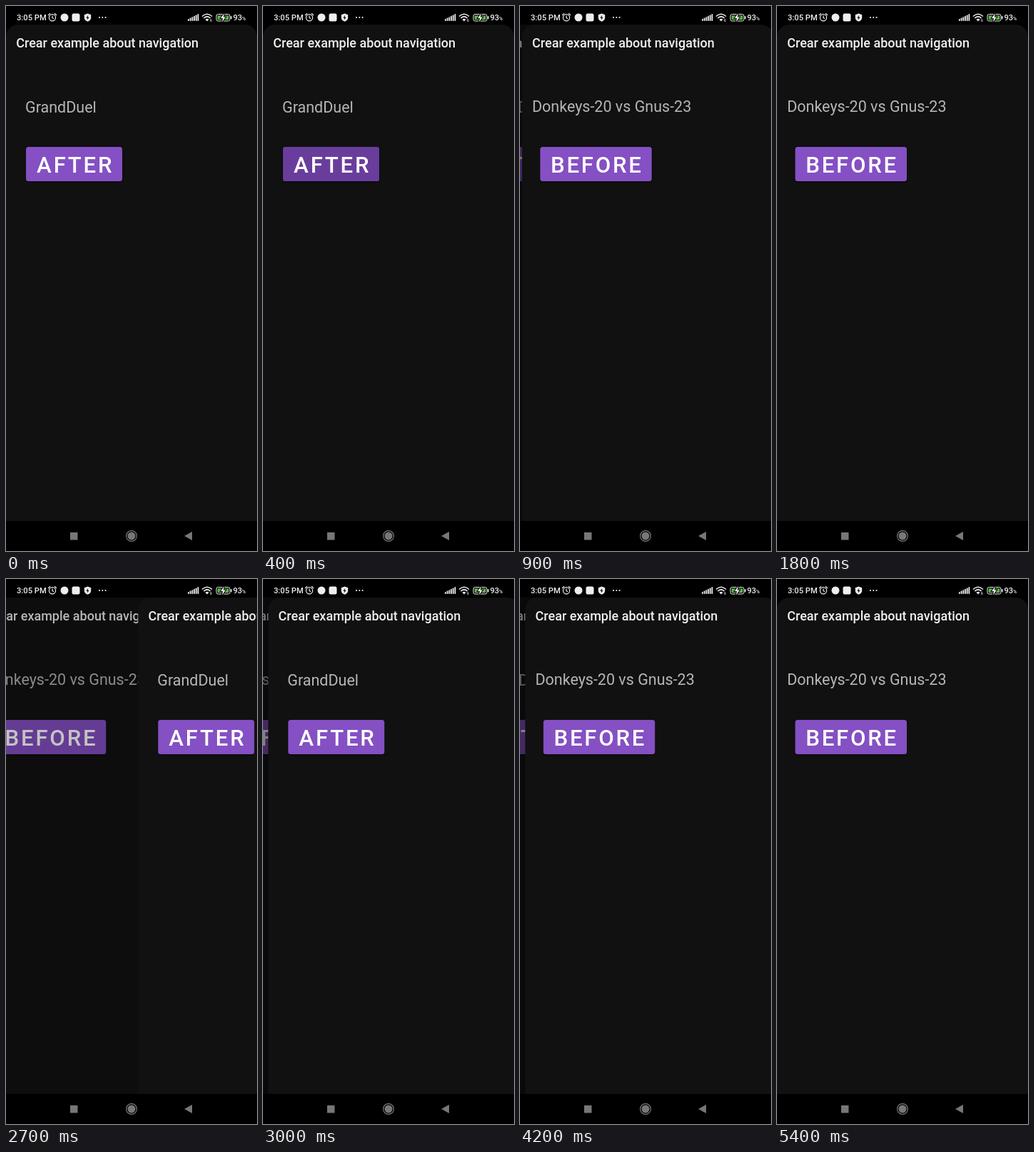
An HTML page that plays this animation: 352 by 762 pixels, repeating every 5500 ms.

```html
<!DOCTYPE html>
<html lang="es">
<head>
<meta charset="utf-8">
<title>Navigation example</title>
<style>
  html, body { margin: 0; width: 100%; height: 100%; overflow: hidden; background: #000; }
  svg { display: block; width: 352px; height: 762px; font-family: Roboto, sans-serif; }
  .title { font-size: 18px; font-weight: 500; fill: #f0f0f0; }
  .body { font-size: 21.5px; fill: #b6b6b6; }
  .label { font-size: 31.2px; font-weight: 500; letter-spacing: .0893em; fill: #fff; }
  .button { fill: #8450c3; filter: drop-shadow(0 1px 1px #0008); }
  .ripple { fill: #693d9c; }
  .status { font-size: 11.2px; font-weight: 500; fill: #eee; }
</style>
</head>
<body>
<svg viewBox="0 0 352 762">
  <rect width="352" height="762"/>
  <g id="pages"></g>

  <g class="status">
    <text x="15" y="20">3:05 PM</text>
    <g fill="none" stroke="#eee" stroke-width="1.2">
      <circle cx="65" cy="16.3" r="4.6"/>
      <path d="M65 13.5v3l2 1.3M59 13l3-2.7M71 13l-3-2.7"/>
    </g>
    <circle cx="82" cy="16" r="5.5"/>
    <rect x="92.5" y="10.5" width="11" height="11" rx="2.5"/>
    <path d="M114.5 10.5l4.7 1.7v4q0 3.5-4.7 5.5q-4.7-2-4.7-5.5v-4z"/>
    <path d="M115.3 12.7l-3 4h2l-.7 3 3-4h-2z" fill="#000"/>
    <g id="dots"></g>
    <g id="signal"></g>
    <path d="M275 14.5q7-6.5 14 0M277.3 17q4.7-4.2 9.4 0" fill="none" stroke="#eee" stroke-width="1.6"/>
    <path d="M279.5 18.8q2.5-2 5 0l-2.5 2.7z"/>
    <text x="286" y="21.5" font-size="5">6</text>
    <rect x="295" y="11.5" width="19" height="9.5" rx="2.5" fill="none" stroke="#eee"/>
    <rect x="296.7" y="13.2" width="15.6" height="6.1" rx="1" fill="#5cb84a"/>
    <rect x="315" y="14" width="1.5" height="4.5" rx=".7"/>
    <path d="M306 10l-5 7h3l-1 5.5 5-7h-3z" stroke="#000" stroke-width="2" paint-order="stroke"/>
    <text x="318.5" y="20">93</text>
    <text x="331" y="20" font-size="7">%</text>
  </g>

  <g fill="#777">
    <rect y="720" width="352" height="42" fill="#000"/>
    <rect x="90" y="736" width="10.5" height="10.5"/>
    <circle cx="176" cy="741" r="5.5"/>
    <circle cx="176" cy="741" r="7.4" fill="none" stroke="#777" stroke-width="1.2"/>
    <path d="M250 741l11-6v12z"/>
  </g>
</svg>
<script>
const WIDTH = 352, LOOP = 5500, STEP = 100, SPRING = 0.014;
const $ = id => document.getElementById(id);

const pages = [
  { text: 'GrandDuel', textX: 27, textY: 148.5, label: 'AFTER', labelX: 43.1, x: 28, w: 135 },
  { text: 'Donkeys-20 vs Gnus-23', textX: 14.2, textY: 147.5, label: 'BEFORE', labelX: 40.2, x: 25.5, w: 156.5 }
];

// press: the finger touches the button; go: the next page starts to slide in
const moves = [
  { press: 50, go: 406, from: 0 },
  { press: 2350, go: 2586, from: 1 },
  { press: 3612, go: 3786, from: 0 }
];

const sheet = 'M0 720V43a17 17 0 0 1 17-17H335a17 17 0 0 1 17 17V720z';
const box = p => `x="${p.x}" y="197" width="${p.w}" height="48" rx="3.5"`;

$('pages').innerHTML = pages.map((p, i) => `
  <g>
    <path d="${sheet}" fill="#111"/>
    <text class="title" x="14.3" y="58">Crear example about navigation</text>
    <text class="body" x="${p.textX}" y="${p.textY}">${p.text}</text>
    <rect class="button" ${box(p)}/>
    <clipPath id="clip${i}"><rect ${box(p)}/></clipPath>
    <g clip-path="url(#clip${i})"><circle class="ripple" cy="221"/></g>
    <text class="label" x="${p.labelX}" y="233">${p.label}</text>
    <path class="dim" d="${sheet}"/>
  </g>`).join('');

pages.forEach((p, i) => {
  p.node = $('pages').children[i];
  p.ripple = p.node.querySelector('.ripple');
  p.dim = p.node.querySelector('.dim');
});

$('dots').innerHTML = [131, 135.3, 139.6].map(x => `<circle cx="${x}" cy="16" r="1.1"/>`).join('');
$('signal').innerHTML = [0, 1, 2, 3, 4, 5].map(i =>
  `<rect x="${255 + i * 2.7}" y="${18 - i * 1.4}" width="1.8" height="${3 + i * 1.4}" rx=".8"/>`).join('');

const clamp = v => Math.max(0, Math.min(1, v));

function place(page, x, dim, visible) {
  page.node.setAttribute('transform', `translate(${x} 0)`);
  page.node.style.display = visible ? '' : 'none';
  page.dim.setAttribute('opacity', dim);
  page.ripple.setAttribute('r', 0);
}

function drawRipple(page, sincePress, sinceGo) {
  const grow = 1 - (1 - clamp(sincePress / 150)) ** 3;
  page.ripple.setAttribute('cx', page.x + page.w / 2 - 30 * (1 - grow));
  page.ripple.setAttribute('r', grow * Math.hypot(page.w, 48) / 2);
  page.ripple.setAttribute('opacity', 1 - clamp(sinceGo / 120));
}

// Critically damped spring from the right edge to rest
function slideX(age) {
  if (age <= 0) return WIDTH;
  const s = SPRING * age, x = WIDTH * (1 + s) * Math.exp(-s);
  return x < 1 ? 0 : x;
}

function draw(t) {
  const move = moves.filter(m => m.press <= t).pop() || { press: LOOP, go: LOOP, from: 0 };
  const below = pages[move.from], above = pages[1 - move.from];
  const x = slideX(t - move.go), travel = 1 - x / WIDTH;
  if (above.node.nextElementSibling) $('pages').append(above.node);
  place(below, -WIDTH * travel / 4, 0.5 * travel, x > 0);
  place(above, x, 0, x < WIDTH);
  drawRipple(below, t - move.press, t - move.go);
}

const start = performance.now();
function frame() {
  const t = (performance.now() - start) % LOOP;
  draw(t - t % STEP);
  requestAnimationFrame(frame);
}
frame();
</script>
</body>
</html>
```
